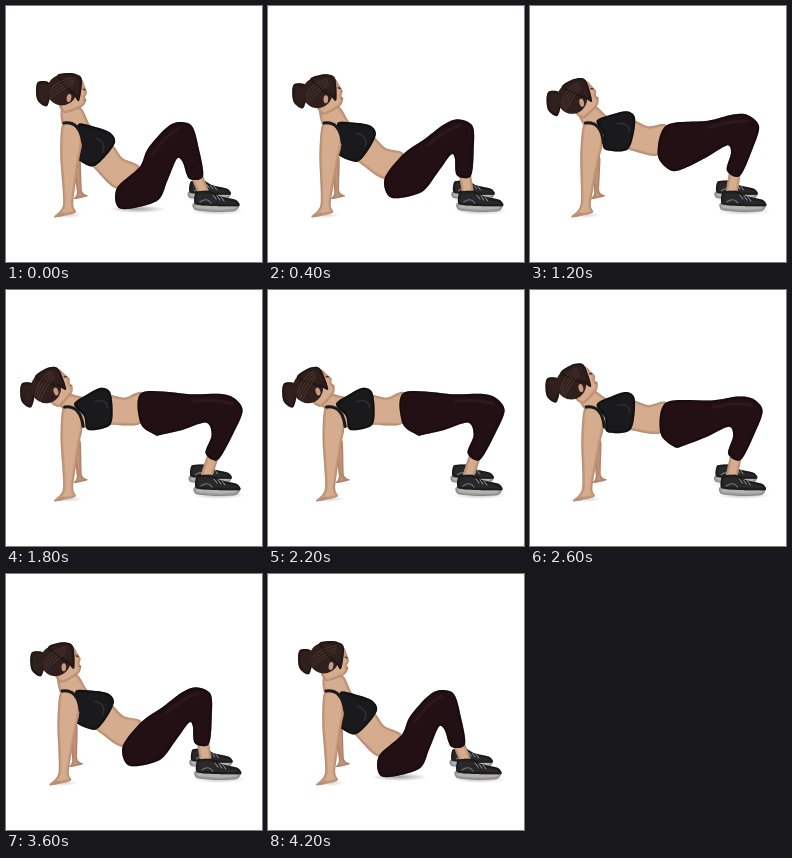
An HTML page with a canvas that plays this animation: 256 px wide and 256 px high, repeating every 4.4 s.

```html
<!DOCTYPE html>
<html lang="en">
<head>
<meta charset="utf-8">
<title>Reverse tabletop exercise</title>
<style>
html, body { margin: 0; width: 100%; height: 100%; overflow: hidden; background: #fff; }
canvas { display: block; width: 256px; height: 256px; }
</style>
</head>
<body>
<canvas id="stage" width="256" height="256"></canvas>
<script>
const ctx = document.getElementById('stage').getContext('2d');
const STEP = 200, STEPS = 22, TOP_STEP = 10;
const SKIN = '#d5ac8e', SKIN_EDGE = '#8f5f49', PANTS = '#221014', BRA = '#1a1a1c', HAIR = '#30201d', BLACK = '#0b0606';

const mix = (a, b, t) => a + (b - a) * t;

// Maps (share of the bone's length, pixels to its left side) to the stage.
function bone(a, b) {
  const dx = b[0] - a[0], dy = b[1] - a[1], length = Math.hypot(dx, dy);
  return (u, v) => [a[0] + dx * u + dy / length * v, a[1] + dy * u - dx / length * v];
}

// Lower meeting point of two bones that start at a and b.
function joint(a, b, lengthA, lengthB) {
  const gap = Math.hypot(b[0] - a[0], b[1] - a[1]);
  const along = (lengthA ** 2 - lengthB ** 2 + gap ** 2) / (2 * gap);
  return bone(a, b)(along / gap, -Math.sqrt(Math.max(0, lengthA ** 2 - along ** 2)));
}

// Closed smooth curve through the points.
function outline(points, tension) {
  const n = points.length, path = new Path2D();
  path.moveTo(...points[0]);
  for (let i = 0; i < n; i++) {
    const [a, b, c, d] = [n - 1, 0, 1, 2].map(k => points[(i + k) % n]);
    path.bezierCurveTo(
      b[0] + (c[0] - a[0]) * tension, b[1] + (c[1] - a[1]) * tension,
      c[0] - (d[0] - b[0]) * tension, c[1] - (d[1] - b[1]) * tension, ...c);
  }
  return path;
}

function shape(points, color, edge, tension = 0.15) {
  const path = outline(points, tension);
  ctx.fillStyle = color;
  ctx.fill(path);
  ctx.save();
  ctx.clip(path);
  ctx.strokeStyle = edge;
  ctx.globalAlpha = 0.25;
  for (const width of [2, 5]) {
    ctx.lineWidth = width;
    ctx.stroke(path);
  }
  ctx.restore();
}

function curve(from, bend, to, color, width) {
  ctx.beginPath();
  ctx.moveTo(...from);
  ctx.quadraticCurveTo(...bend, ...to);
  ctx.strokeStyle = color;
  ctx.lineWidth = width;
  ctx.lineCap = 'round';
  ctx.stroke();
}

function oval(x, y, rx, ry, color, turn = 0) {
  ctx.beginPath();
  ctx.ellipse(x, y, rx, ry, turn, 0, 2 * Math.PI);
  ctx.fillStyle = color;
  ctx.fill();
}

function shadow(x, y, rx, ry, alpha) {
  ctx.save();
  ctx.translate(x, y);
  ctx.scale(rx, ry);
  const fade = ctx.createRadialGradient(0, 0, 0, 0, 0, 1);
  fade.addColorStop(0, `rgba(70,70,70,${alpha})`);
  fade.addColorStop(1, 'rgba(70,70,70,0)');
  oval(0, 0, 1, 1, fade);
  ctx.restore();
}

function drawShoe(x, y, scale) {
  ctx.save();
  ctx.translate(x, y);
  ctx.scale(scale, scale);
  shape([[0, -8], [1, -1], [22, 1], [41, 0], [45, -6], [30, -8]], '#b4b3b1', '#555', 0.1);
  shape([[2, -19], [16, -20], [25, -15], [42, -11], [45, -5], [20, -5], [1, -7]], '#29292b', '#000', 0.1);
  curve([6, -9], [13, -14], [17, -8], '#77777a', 1.2);
  for (let lace = 0; lace < 3; lace++) curve([19 + lace * 4, -16 + lace], [21 + lace * 4, -14 + lace], [22 + lace * 4, -12 + lace], '#aaa', 0.9);
  ctx.restore();
}

function drawHead(chin, tilt, bun) {
  const [x, y] = bun;
  shape([[x - 5, y - 9], [x + 5, y - 9], [x + 8, y - 1], [x + 4, y + 15], [x - 5, y + 10], [x - 7, y]], HAIR, BLACK);
  ctx.save();
  ctx.translate(...chin);
  ctx.rotate(tilt);
  shape([[-2, -27], [2, -19], [4, -13], [2, -9], [3, -5], [-1, 1], [-18, 7], [-24, -2], [-18, -24]], SKIN, SKIN_EDGE, 0.12);
  oval(-21, -16, 15, 15.5, HAIR, 0.3);
  shape([[-26, -30], [-13, -33], [-3, -30], [-1, -23], [-4, -5], [-9, -11], [-13, -14]], HAIR, BLACK);
  oval(-14, -8, 2.3, 4, '#c79b82', 0.2);
  for (let strand = 0; strand < 4; strand++) {
    curve([-33, -16 + strand * 3], [-24, -27 + strand * 4], [-9, -28 + strand * 2], '#513a31', 0.8);
  }
  curve([0, -17], [1, -17], [2, -16], '#352522', 1.2);
  curve([1, -6], [2, -6], [3, -6], '#a6655a', 1);
  ctx.restore();
}

function drawFigure(p) {
  const lift = p * (2 - p), sway = Math.sin(Math.PI * p);
  const hand = [48 + 3 * p - 9 * sway, 211];
  const shoulder = [65 + 2 * p - 4 * sway, 122];
  const knee = [mix(177, 229, lift), mix(122, 117, lift)];
  const ankle = [mix(190, 206, lift), mix(171, 166, lift)];
  const hip = joint(shoulder, knee, mix(89, 82, lift), mix(78, 81, lift));
  const chin = [mix(77, 66, lift), 100 - 4 * lift + 8 * p ** 3];
  const bun = [mix(37, 21, lift), 85 + 20 * p ** 1.4];
  const heel = 188 + 3 * sway;

  const torso = bone(shoulder, hip), thigh = bone(hip, knee), calf = bone(knee, ankle);
  const arm = bone(shoulder, [hand[0] + 15, 205]);
  const nearHand = (x, y) => [hand[0] + x, hand[1] + y];
  const nearShoulder = (x, y) => [shoulder[0] + x, shoulder[1] + y];

  ctx.fillStyle = '#fff';
  ctx.fillRect(0, 0, 256, 256);
  shadow(hip[0] + 2, 203, 28, 4, Math.max(0, 0.5 - p * 2.5));
  shadow(heel + 23, 205, 27, 4, 0.35);
  shadow(heel + 16, 193, 24, 4, 0.25);
  shadow(hand[0] + 13, 209, 16, 3, 0.25);

  // far arm and foot
  shape([arm(0.3, 2), arm(0.35, 10), nearHand(28, -26), nearHand(34, -21), nearHand(20, -18), nearHand(23, -25)], '#c69a80', SKIN_EDGE, 0.1);
  drawShoe(heel - 5, 193, 0.92);

  // near foot
  shape([calf(0.9, -5), calf(0.9, 6), [heel + 16, 189], [heel + 5, 189]], SKIN, SKIN_EDGE, 0.06);
  drawShoe(heel, 205, 1);

  const waist = [torso(0.86, 19), torso(0.84, -12)];
  shape([
    [chin[0] - 21, chin[1] + 2], [chin[0] - 2, chin[1] + 2], torso(0.15, 15), torso(0.45, 17),
    torso(0.65, 14), ...waist, torso(0.46, -13), torso(0.2, -17), nearShoulder(-9, -3)
  ], SKIN, SKIN_EDGE, 0.13);
  drawHead(chin, -0.5 * lift, bun);

  shape([
    torso(0.03, 8), torso(0.2, 18), torso(0.36, 24), torso(0.47, 20),
    torso(0.5, 2), torso(0.46, -14), torso(0.2, -18), torso(0.15, -4)
  ], BRA, '#000');
  curve(torso(0.28, 10), torso(0.42, 14), torso(0.44, 4), '#303032', 1.5);

  shape([
    waist[0], thigh(0.5, 15), thigh(0.82, 14), thigh(1, 9),
    calf(0, 9), calf(0.48, 10), calf(1.02, 7), calf(1, -7), calf(0.65, -9),
    thigh(0.64, -14), thigh(0.34, -20), thigh(0.05, -24), torso(1.03, -24), waist[1]
  ], PANTS, '#0d0406');
  curve(thigh(0.5, 8), thigh(0.8, 9), thigh(0.97, 3), '#2d191d', 3);

  shape([
    nearShoulder(-9, -3), nearShoulder(3, -5), arm(0.07, 11), arm(0.23, 11), arm(0.37, 9), arm(0.9, 4),
    nearHand(22, -5), nearHand(13, -2), nearHand(0, 0), arm(0.92, -6), arm(0.35, -10)
  ], SKIN, SKIN_EDGE, 0.13);
  curve(nearShoulder(-7, -5), nearShoulder(9, -7), arm(0.17, 12), BRA, 3);
  curve(nearHand(4, -1), nearHand(7, -3), nearHand(10, -4), '#aa7c65', 0.8);
}

function frame(now) {
  const step = Math.floor(now / STEP) % STEPS;
  drawFigure(Math.max(0, 1 - Math.abs(step / TOP_STEP - 1)));
  requestAnimationFrame(frame);
}
drawFigure(0);
requestAnimationFrame(frame);
</script>
</body>
</html>
```
